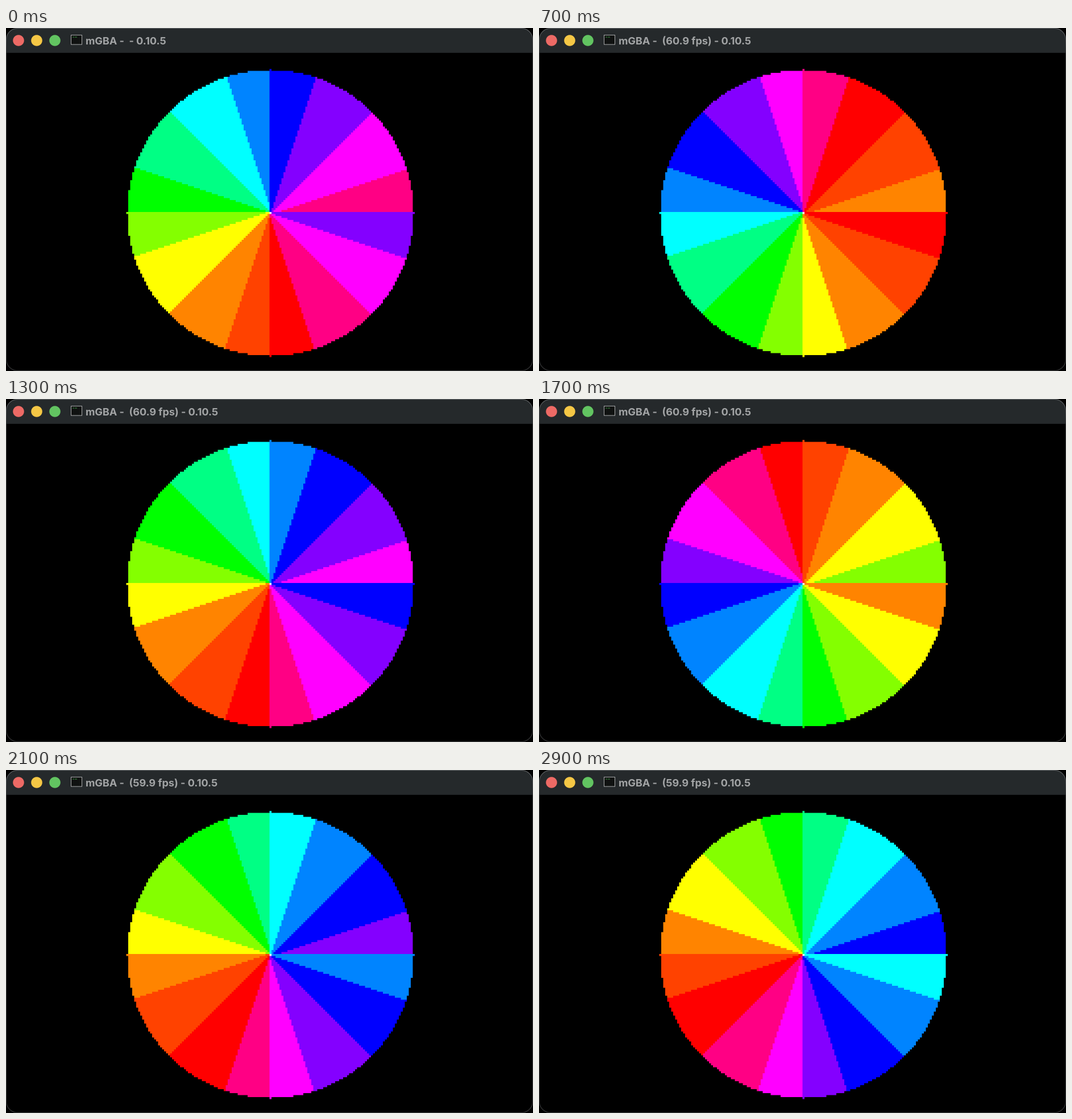
An HTML page with a canvas for the animation above (3 s loop, 927x604 px).

```html
<!DOCTYPE html>
<html lang="en">
<head>
<meta charset="utf-8">
<title>Colour wheel</title>
<style>
  html, body { margin: 0; width: 100%; height: 100%; overflow: hidden; background: #000; }
  canvas { display: block; width: 927px; height: 604px; }
</style>
</head>
<body>
<canvas id="stage" width="1854" height="1208"></canvas>
<script>
const ctx = document.getElementById('stage').getContext('2d');
const W = 927, H = 604, LOOP = 3000, TICK = 100;
const CELL = 3.5, RADIUS = 72, CX = 463.5, CY = 324;
const COLORS = [
  '#ff0000', '#ff4200', '#ff8400', '#ffff00', '#84ff00', '#00ff00', '#00ff84',
  '#00ffff', '#0084ff', '#0000ff', '#8400ff', '#ff00ff', '#ff0084'
];

// Counter-clockwise sector 0..15, found with whole-number slope tests
function sectorOf(x, y) {
  let quad, u, v;
  if (y < 0) [quad, u, v] = x >= 0 ? [0, x, -y] : [1, -y, -x];
  else [quad, u, v] = x < 0 ? [2, -x, y] : [3, y, x];
  const part = v < Math.floor(u / 3) ? 0
    : v < u ? 1
    : Math.floor(v / 3) < u ? 2 : 3;
  return quad * 4 + part;
}

function buildSectors() {
  const paths = Array.from({ length: 16 }, () => new Path2D());
  for (let y = -RADIUS; y <= RADIUS; y++) {
    for (let x = -RADIUS; x <= RADIUS; x++) {
      if (x * x + y * y > RADIUS * RADIUS) continue;
      paths[sectorOf(x, y)].rect(CX + x * CELL, CY + y * CELL, CELL, CELL);
    }
  }
  return paths;
}
const sectors = buildSectors();

// The wheel turns 1.5 colours per tick, with a short stall and a skip early on
function colorShift(tick) {
  return tick < 5
    ? 10 + Math.floor(1.5 * Math.min(tick, 3) + 0.5)
    : 26 + Math.floor(1.5 * (tick - 7) + 0.5);
}

function titleAt(tick) {
  const fps = tick < 5 ? '' : tick < 20 ? '(60.9 fps)' : '(59.9 fps)';
  return `mGBA -  ${fps ? fps + ' ' : ''}- 0.10.5`;
}

function disc(x, color) {
  ctx.fillStyle = color;
  ctx.beginPath();
  ctx.arc(x, 22, 9.8, 0, Math.PI * 2);
  ctx.fill();
}

function box(x, y, w, h, color) {
  ctx.fillStyle = color;
  ctx.fillRect(x, y, w, h);
}

function drawWindow(title) {
  box(0, 0, W, H, '#000');
  ctx.save();
  ctx.beginPath();
  ctx.roundRect(0, 0, W, H, 20);
  ctx.clip();
  box(0, 0, W, 44, '#25292b');
  box(0, 43, W, 1, '#1b1e20');
  ctx.restore();

  const edge = ctx.createLinearGradient(0, 0, 0, 44);
  edge.addColorStop(0, '#66696b');
  edge.addColorStop(1, '#3e3f40');
  ctx.strokeStyle = edge;
  ctx.lineWidth = 1;
  ctx.beginPath();
  ctx.roundRect(0.5, 0.5, W - 1, H - 1, 20);
  ctx.stroke();

  disc(22, '#ed6a65');
  disc(54, '#f5c745');
  disc(86, '#62c461');

  box(114, 12, 20, 17.5, '#a9abac');
  box(115, 13, 18, 15.5, '#101211');
  box(117, 15.5, 3, 1, '#3f9a45');
  box(121, 15.5, 4, 1, '#3f9a45');

  ctx.fillStyle = '#a2a4a5';
  ctx.font = '700 18px Inter, sans-serif';
  ctx.textBaseline = 'alphabetic';
  ctx.fillText(title, 140, 29);
}

function drawWheel(shift) {
  sectors.forEach((path, s) => {
    ctx.fillStyle = COLORS[(shift + 15 - s) % COLORS.length];
    ctx.fill(path);
  });
  box(CX, CY, CELL, CELL, '#fff');
}

let shown = -1;
function frame(now) {
  const tick = Math.floor((now % LOOP) / TICK);
  if (tick !== shown) {
    shown = tick;
    ctx.setTransform(2, 0, 0, 2, 0, 0);
    drawWindow(titleAt(tick));
    drawWheel(colorShift(tick));
  }
  requestAnimationFrame(() => frame(performance.now() - start));
}
const start = performance.now();
frame(0);
</script>
</body>
</html>
```
